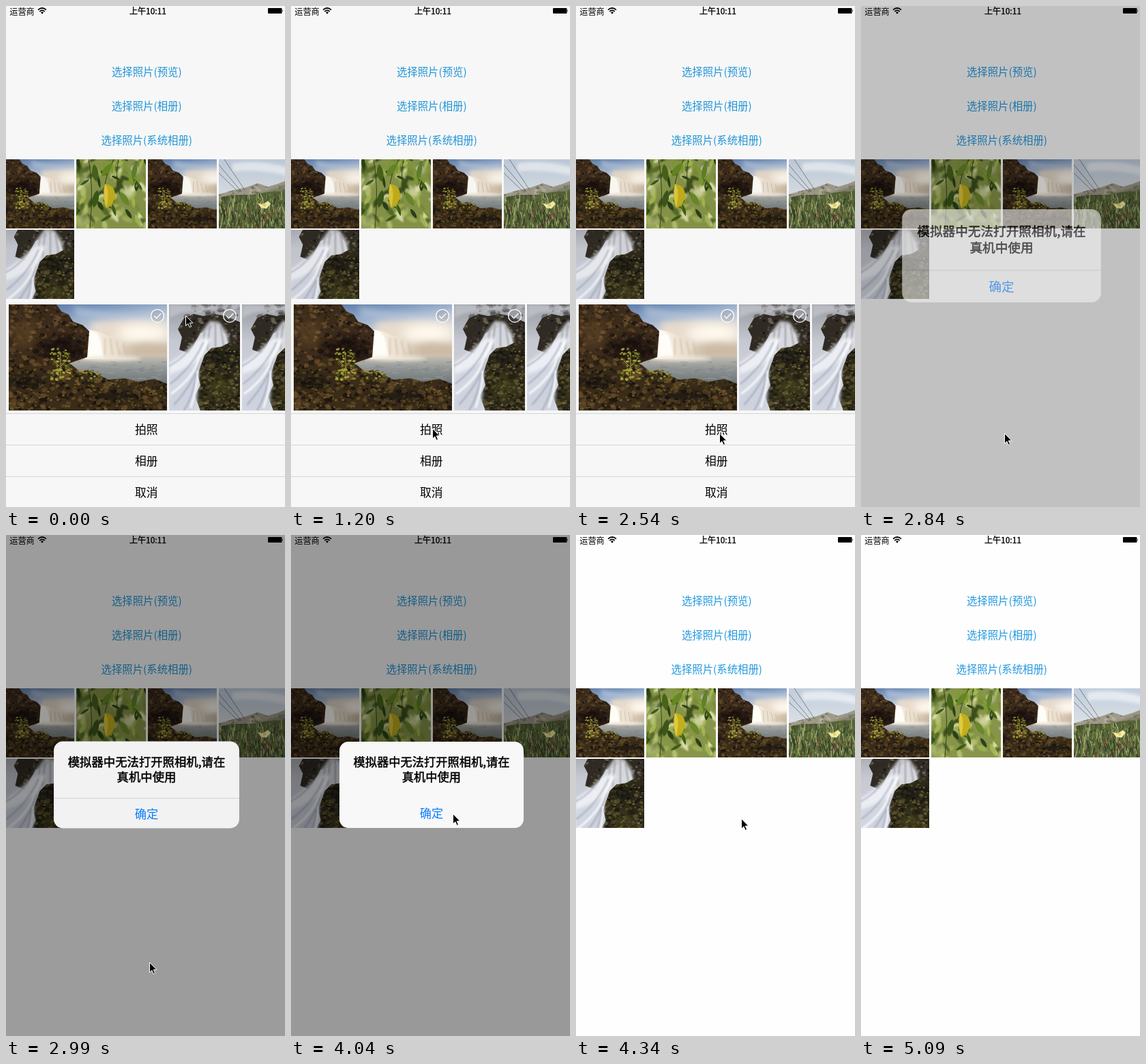
Animation of 409x732 px, one loop 6250 ms. Source, as an HTML page:

```html
<!DOCTYPE html>
<html lang="zh-CN">
<head>
<meta charset="utf-8">
<title>选择照片</title>
<style>
html, body { margin: 0; width: 100%; height: 100%; overflow: hidden; background: #fff; }
svg { display: block; }
#stage { width: 409px; height: 732px; }
text { font-family: "Noto Sans CJK SC", "Noto Sans CJK", "Noto Sans", sans-serif; text-anchor: middle; }
</style>
</head>
<body>
<svg id="stage" viewBox="0 0 409 732" xmlns="http://www.w3.org/2000/svg"></svg>
<script>
const LOOP = 6250;
const BLUE = '#2299de';

// Seeded random numbers for the photo textures
let seed = 7;
const rnd = () => (seed = (seed * 16807) % 2147483647) / 2147483647;
const span = (a, b) => a + rnd() * (b - a);
const num = v => v.toFixed(1);

// Ragged five-sided stones, one path per colour
function stones([x, y, w, h], count, colors, size, opacity = 0.75) {
  return colors.map(c => {
    let d = '';
    for (let i = 0; i < count; i++) {
      const cx = x + rnd() * w, cy = y + rnd() * h, r = size * span(0.4, 1), turn = rnd() * 6;
      const points = [0, 1, 2, 3, 4].map(k => {
        const a = turn + k * 1.257, q = r * span(0.5, 1.1);
        return `${num(cx + q * Math.cos(a))} ${num(cy + q * 0.75 * Math.sin(a))}`;
      });
      d += `M${points.join('L')}z`;
    }
    return `<path d="${d}" fill="${c}" opacity="${opacity}"/>`;
  }).join('');
}

function blades([x, y, w, h], count, colors, len, lean, width) {
  return colors.map(c => {
    let d = '';
    for (let i = 0; i < count; i++) {
      d += `M${num(x + rnd() * w)} ${num(y + rnd() * h)}l${num(span(-lean, lean))} ${num(-span(len / 2, len))}`;
    }
    return `<path d="${d}" stroke="${c}" stroke-width="${width}" fill="none"/>`;
  }).join('');
}

const mass = (id, d, fill, detail) =>
  `<clipPath id="${id}"><path d="${d}"/></clipPath><path d="${d}" fill="${fill}"/><g clip-path="url(#${id})">${detail}</g>`;

const symbol = (id, w, h, body) =>
  `<symbol id="${id}" viewBox="0 0 ${w} ${h}" preserveAspectRatio="xMidYMid slice">${body}</symbol>`;

const gradient = (id, dir, ...stops) =>
  `<linearGradient id="${id}" ${dir}>${stops.map(([o, c, a = 1]) =>
    `<stop offset="${o}" stop-color="${c}" stop-opacity="${a}"/>`).join('')}</linearGradient>`;

const DOWN = 'x2="0" y2="1"';
const strokes = (d, c, w, extra = '') =>
  `<path d="${d}" fill="none" stroke="${c}" stroke-width="${w}" stroke-linecap="round" ${extra}/>`;
const haze = (cx, cy, rx, ry, c, r, opacity = 1) =>
  `<ellipse cx="${cx}" cy="${cy}" rx="${rx}" ry="${ry}" fill="${c}" opacity="${opacity}" filter="url(#soft${r})"/>`;
const soft = (d, c, r, opacity = 1) =>
  `<path d="${d}" fill="${c}" opacity="${opacity}" filter="url(#soft${r})"/>`;

const lagoon = () => symbol('lagoon', 232, 155, `
  <rect width="232" height="155" fill="url(#skyA)"/>
  ${soft('M95 2Q150 18 232 12V30Q160 22 100 18z', '#bccade', 4, 0.6)}
  ${soft('M120 26Q170 20 232 28V80H130z', '#e9dccb', 4, 0.9)}
  ${haze(196, 42, 38, 13, '#fffaf0', 8)}
  ${soft('M168 60L200 55 240 58V80H160z', '#c5b49d', 4, 0.8)}
  <rect x="80" y="76" width="152" height="42" fill="url(#lake)"/>
  ${blades([90, 84, 140, 28], 26, ['#a5a8a6', '#747d80'], 1, 14, 0.7)}
  <path d="M114 37Q128 37 146 46Q168 50 190 60L186 80H112z" fill="url(#fall)"/>
  ${soft('M115 38Q128 38 134 50L139 78H117z', '#fffdf8', 1)}
  ${strokes('M141 50V74M149 51L152 74M158 54L163 75M168 57L173 75', '#c5b5a0', 2, 'opacity=".55" filter="url(#soft1)"')}
  ${haze(150, 79, 45, 4, '#efe8dc', 2, 0.8)}
  ${mass('cliff', 'M0 0H70L77 10 88 15 94 25 108 30 118 39 115 77 100 82 84 88 62 90 0 98z', '#3b2b1b',
    stones([0, 0, 118, 96], 60, ['#17120f', '#5b4227', '#2a1e15', '#6e502c'], 6) +
    stones([0, 0, 118, 90], 45, ['#120f0e', '#80613a'], 3) +
    soft('M38 60L80 44 112 62 112 80 60 84z', '#130f0d', 4, 0.75) + haze(22, 40, 18, 24, '#6b4d29', 8, 0.55))}
  ${mass('shore', 'M0 78L22 82 48 78 72 82 92 88 104 98 116 96 130 102 146 110 170 108 190 113 214 109 232 116V155H0z', '#3a2c19',
    stones([0, 78, 232, 77], 85, ['#14110d', '#5e4726', '#241c12', '#6f5128'], 7) +
    stones([0, 86, 232, 69], 85, ['#0f0d0b', '#87662f', '#666329'], 3.4) +
    haze(24, 112, 30, 8, '#0f0d0b', 4, 0.6) + haze(150, 134, 46, 7, '#110f0c', 4, 0.55))}
  ${stones([60, 64, 30, 46], 26, ['#4f581c', '#8a8c2e', '#b0aa40'], 3.6, 0.9)}
  ${stones([104, 96, 34, 14], 14, ['#5c6022', '#a0923a'], 3.4, 0.9)}
  ${strokes('M76 110V72M76 92L66 82M77 90L87 78', '#9c9c3c', 1)}`);

const leafPath = (x, y, w, h, turn, fill) =>
  `<path d="M0 0C${w} ${h * 0.25} ${w} ${h * 0.75} 0 ${h}C${-w} ${h * 0.75} ${-w} ${h * 0.25} 0 0z"
    transform="translate(${x} ${y}) rotate(${turn})" fill="${fill}"/>`;

const scatter = (count, x1, x2, y2, w, h, colors) => Array.from({ length: count }, (_, i) =>
  leafPath(num(span(x1, x2)), num(span(-8, y2)), num(span(w / 2, w)), num(span(h / 2, h)),
    num(span(-70, 70)), colors[i % colors.length])).join('');

const foliage = () => symbol('foliage', 102, 101, `
  <rect width="102" height="101" fill="#87954a"/>
  <g filter="url(#soft1)">
    ${scatter(90, 0, 102, 95, 6, 22, ['#566b26', '#b3bf6c', '#d8dca8', '#7a8c38', '#3c4f1b', '#9fae55'])}
    ${haze(86, 14, 7, 6, '#eef0d6', 2, 0.85)}${haze(10, 90, 11, 9, '#c6cf88', 4, 0.7)}
    ${haze(76, 48, 8, 7, '#e6e9bd', 2, 0.7)}${haze(12, 30, 7, 9, '#d5dba6', 4, 0.6)}
  </g>
  ${scatter(34, 0, 102, 85, 4.5, 22, ['#3f5c17', '#7d9a30', '#2c401a', '#a3b650'])}
  ${strokes('M18 0Q26 40 20 101M55 0Q42 26 42 40L27 62M62 0Q56 26 64 52', '#34431c', 1)}
  ${leafPath(26, 7, 6, 26, -8, '#46631a')}${leafPath(52, 6, 6, 24, 38, '#668625')}
  ${leafPath(31, 45, 6, 26, 12, '#3a571a')}${leafPath(64, 48, 6, 24, -34, '#6b882b')}
  ${leafPath(88, 4, 5, 26, 12, '#61802a')}
  <path d="M42 36Q57 38 57 53Q55 68 44 71Q38 55 42 36z" fill="#c3af1c"/>
  <path d="M42 36Q50 44 44 71Q38 55 42 36z" fill="#dfca3c"/>`);

const dune = () => symbol('dune', 101, 101, `
  <rect width="101" height="60" fill="url(#skyD)"/>
  ${soft('M20 6Q60 0 101 12V24Q60 14 20 18z', '#edf1f5', 2, 0.8)}
  ${mass('hill', 'M0 51L22 45 40 41 57 35 72 40 86 36 101 30V70H0z', '#a09a8b',
    stones([0, 36, 101, 28], 30, ['#74785f', '#bdb4a2', '#5f6a4c'], 4) +
    soft('M62 50L101 36V56H60z', '#66704f', 2, 0.6))}
  ${strokes('M0 8L33 47M0 20L27 46M8 0L38 45', '#43484c', 0.6)}
  ${mass('grass', 'M0 56L20 52 48 52 70 48 101 46V101H0z', '#56633a',
    stones([0, 48, 101, 53], 40, ['#2f3b22', '#7b8450', '#5d4638'], 4) +
    blades([0, 58, 101, 52], 60, ['#82934f', '#36482a', '#a5ab72', '#5a6f36'], 15, 4, 1.3) +
    blades([0, 78, 101, 34], 22, ['#6d4136', '#2c3821'], 14, 4, 1.4))}
  <path d="M57 64L64 66 72 61 76 65 70 72 62 71z" fill="#f3edaa"/><circle cx="67" cy="67" r="2.3" fill="#e6d15a"/>`);

const rapids = () => symbol('rapids', 104, 155, `
  <rect width="104" height="155" fill="url(#foam)"/>
  ${stones([24, 0, 80, 22], 14, ['#5f5d5d', '#a5a6ac', '#45413d'], 7, 0.75)}
  ${soft('M104 8Q66 4 46 13Q26 6 0 20V0H20Q60 6 104 0z', '#c5c7ce', 2, 0.75)}
  ${mass('ledge', 'M13 36L22 20 36 14 50 17 66 14 84 17 104 26V64L88 60 82 44 70 30 58 38 46 42 38 56 30 72 15 66 19 48z', '#2f2a23',
    stones([12, 12, 92, 60], 34, ['#13110f', '#5a503c', '#3d3824', '#77715f'], 4.5))}
  ${soft('M46 42L60 24 74 26 86 44 88 62 74 64 62 68 46 76 36 72z', '#d9dbe1', 2, 0.9)}
  ${strokes('M52 40L48 70M60 30L56 66M68 28L68 62M76 34L80 60', '#8b8b92', 2, 'opacity=".7" filter="url(#soft1)"')}
  ${mass('crag', 'M104 58L88 56 76 62 62 64 52 74 47 88 42 102 46 118 38 134 46 155H104z', '#2e2a1b',
    stones([36, 50, 68, 105], 55, ['#100f0c', '#4e4524', '#211e14', '#655a34'], 6) +
    stones([46, 60, 58, 95], 45, ['#0d0d0a', '#6d692c', '#86794c'], 2.8) +
    haze(70, 78, 16, 9, '#0f0f0b', 4, 0.6) + haze(72, 122, 18, 18, '#5b5a22', 8, 0.4))}
  ${soft('M62 50Q50 66 44 86Q36 114 0 140V86Q22 72 36 58Q46 46 62 50z', '#eef0f6', 2, 0.95)}
  ${soft('M0 102Q26 94 44 80L43 124 40 155H0z', '#cdd2de', 2, 0.85)}
  ${strokes('M50 56Q34 92 2 116M46 78Q40 110 8 146M40 102Q36 132 22 155M28 68Q16 82 0 90', '#8c93a4', 2, 'opacity=".6" filter="url(#soft1)"')}
  ${strokes('M56 54Q48 70 42 84Q34 108 4 130M42 98Q42 120 32 150', '#fff', 3, 'opacity=".8" filter="url(#soft1)"')}`);

const blur = r => `<filter id="soft${r}" x="-40%" y="-40%" width="180%" height="180%"><feGaussianBlur stdDeviation="${r}"/></filter>`;
const defs = () => `<defs>
  ${[1, 2, 4, 8].map(blur).join('')}
  ${gradient('skyA', 'x2=".25" y2="1"', [0, '#48699a'], [0.2, '#89a2c4'], [0.38, '#d5d8de'], [1, '#ecdfcd'])}
  ${gradient('lake', DOWN, [0, '#c3bdb2'], [0.4, '#929796'], [1, '#6a7174'])}
  ${gradient('fall', '', [0, '#fffaf1'], [0.4, '#efe4d4'], [1, '#e4d6c2', 0])}
  ${gradient('skyD', DOWN, [0, '#c0cddd'], [1, '#dfe3e6'])}
  ${gradient('foam', DOWN, [0, '#96989f'], [0.35, '#c6c9d1'], [1, '#d6dae3'])}
  ${lagoon()}${foliage()}${dune()}${rapids()}</defs>`;

const photo = (id, x, y, w, h) => `<use href="#${id}" x="${x}" y="${y}" width="${w}" height="${h}"/>`;

// Text placed by the middle of its glyphs; bold adds an outline of that width
const label = (s, x, y, size, fill = '#000', bold = 0) =>
  `<text x="${x}" y="${num(y + size * 0.37)}" font-size="${size}" fill="${fill}"` +
  (bold ? ` stroke="${fill}" stroke-width="${bold}"` : '') + `>${s}</text>`;

const statusBar = `
  ${label('运营商', 23.5, 8, 12.2)}
  ${label('上午10:11', 208, 8, 12, '#000', 0.35)}
  <g fill="none" stroke="#000" stroke-width="1.7"><path d="M47 5.6Q53 .4 59 5.6M49.3 8Q53 4.8 56.7 8"/></g>
  <path d="M51 9.4Q53 7.8 55 9.4L53 11.8z"/>
  <rect x="384" y="3" width="20.5" height="8" rx="1"/><path d="M405.2 5.2q1.6 1.8 0 3.6z"/>`;

const tick = x => `<g transform="translate(${x} 452.7)" fill="none" stroke="#fff" stroke-width="1.3">
  <circle r="9.4" fill="#888" fill-opacity=".25"/><path d="M-4.8 0L-1.3 3.6 5.2-3.4"/></g>`;

const sheet = `<g id="sheet"><rect y="432" width="409" height="300" fill="#f7f7f7"/>
  ${photo('lagoon', 4, 436, 232, 155)}${photo('rapids', 239, 436, 104, 155)}${photo('rapids', 346, 436, 104, 155)}
  ${tick(222)}${tick(328)}
  ${['拍照', '相册', '取消'].map((s, i) =>
    `<rect y="${595 + 46 * i}" width="409" height="1" fill="#d6d6d6"/>` + label(s, 205.7, 619 + 46 * i, 16.8)).join('')}</g>`;

const dialog = `<g id="dialog"><rect id="panel" x="71" y="302" width="270" height="126" rx="13"/>
  ${label('模拟器中无法打开照相机,请在', 206, 332, 17.25, '#000', 0.5)}
  ${label('真机中使用', 206, 354, 17.25, '#000', 0.5)}
  <rect id="rule" x="71" y="384" width="270" height="1" fill="#d2d2d4"/>
  ${label('确定', 206, 407, 17.2, '#0a7cff')}</g>`;

const $ = id => document.getElementById(id);
$('stage').innerHTML = `${defs()}<rect width="409" height="732" fill="#fefefe"/>
  ${label('选择照片(预览)', 206.3, 96.3, 15.4, BLUE)}
  ${label('选择照片(相册)', 206.3, 146.3, 15.4, BLUE)}
  ${label('选择照片(系统相册)', 206.3, 196.3, 15.4, BLUE)}
  ${photo('lagoon', -1, 224, 101, 101)}${photo('foliage', 103, 224, 102, 101)}
  ${photo('lagoon', 208, 224, 101, 101)}${photo('dune', 312, 224, 101, 101)}${photo('rapids', -1, 327, 101, 101)}
  ${statusBar}<rect id="dim" width="409" height="732"/>${sheet}${dialog}
  <path id="cursor" d="M.5.5V15.2L3.8 12 6.2 17.4 8.6 16.3 6.2 11.1H10.8z" stroke="#fff" stroke-width="1"/>`;

// Pointer: time, x, y
const POINTER = [
  [0, 263, 452], [900, 204, 611], [1050, 206, 616], [1200, 207, 617], [2100, 210, 620], [2540, 210, 624],
  [2990, 210, 624], [3590, 237, 404], [3740, 237, 407], [4040, 237, 407], [4190, 236, 409], [4940, 291, 455]
];

// Screen states: start, dim, sheet shown, dialog opacity, dialog scale, panel colour, rule opacity
const STATES = [
  [0, 0.028, 1, 0, 1, '#f2f2f2', 1],
  [2840, 0.24, 0, 0.6, 1.08, '#f2f2f2', 1],
  [2990, 0.388, 0, 1, 1.007, '#f2f2f2', 1],
  [3140, 0.4, 0, 1, 1, '#f8f8f8', 1],
  [4040, 0.4, 0, 1, 1, '#f8f8f8', 0],
  [4190, 0.075, 0, 0.2, 1, '#f8f8f8', 0],
  [4340, 0, 0, 0, 1, '#f8f8f8', 0]
];

function pointerAt(t) {
  const i = POINTER.findIndex(k => k[0] > t);
  if (i < 0) return POINTER[POINTER.length - 1].slice(1);
  const [a, b] = [POINTER[i - 1], POINTER[i]];
  const p = (t - a[0]) / (b[0] - a[0]);
  const e = p * p * (3 - 2 * p);
  return [1, 2].map(n => Math.round(a[n] + (b[n] - a[n]) * e));
}

// The screen advances in 150 ms steps with one longer pause
function stepTime(t) {
  if (t < 2540) return Math.floor(t / 150) * 150;
  if (t < 2840) return 2540;
  return 2840 + Math.floor((t - 2840) / 150) * 150;
}

let shown = -1;
function draw(now) {
  const t = stepTime(now % LOOP);
  if (t === shown) return;
  shown = t;
  const [, dim, open, alpha, scale, color, rule] = STATES.filter(s => s[0] <= t).pop();
  $('dim').setAttribute('opacity', dim);
  $('sheet').setAttribute('display', open ? 'inline' : 'none');
  $('dialog').setAttribute('opacity', alpha);
  $('dialog').setAttribute('transform', `translate(206 365) scale(${scale}) translate(-206 -365)`);
  $('panel').setAttribute('fill', color);
  $('rule').setAttribute('opacity', rule);
  $('cursor').setAttribute('transform', `translate(${pointerAt(t)})`);
  $('cursor').setAttribute('display', t < 5090 ? 'inline' : 'none');
}

const start = performance.now();
function run() {
  draw(performance.now() - start);
  requestAnimationFrame(run);
}
run();
</script>
</body>
</html>
```
